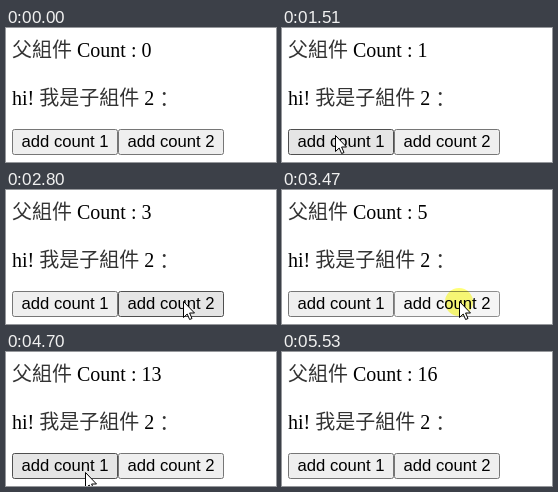
These frames come from a looping animation (270x134 px, 6.19 s). An HTML page:

```html
<!DOCTYPE html>
<html lang="zh-TW">
<head>
<meta charset="utf-8">
<style>
html, body { margin: 0; width: 100%; height: 100%; overflow: hidden; background: #fff; }
svg { display: block; }
.line { font: 20px "Liberation Serif", "Noto Sans CJK TC", "Noto Sans CJK", serif; }
.thin { font-weight: 300; fill: #333; }
.btn text { font: 16.667px "Liberation Sans", sans-serif; text-anchor: middle; }
.btn rect { fill: #efefef; stroke: #767676; }
.btn.hover rect { fill: #e5e5e5; stroke: #4f4f4f; }
.btn.active rect { fill: #f5f5f5; stroke: #8d8d8d; }
#halo { fill: #ffff78; mix-blend-mode: multiply; }
</style>
</head>
<body>
<svg width="270" height="134">
  <text class="line" x="6" y="29"><tspan class="thin">父組件</tspan> Count : <tspan id="count">0</tspan></text>
  <text class="line" x="6" y="77">hi! <tspan class="thin">我是子組件</tspan> 2<tspan class="thin" dy="2">：</tspan></text>
  <g class="btn">
    <rect x="6.5" y="101.5" width="105" height="25" rx="2"/>
    <text x="59" y="119">add count 1</text>
  </g>
  <g class="btn">
    <rect x="112.5" y="101.5" width="105" height="25" rx="2"/>
    <text x="165" y="119">add count 2</text>
  </g>
  <g id="mouse">
    <circle id="halo" cy="1" r="14"/>
    <path d="M.5 .5V16.5L4.2 13L6.6 18.5L9 17.5L6.6 12H11.5Z" fill="#fff" stroke="#000"/>
  </g>
</svg>
<script>
const LOOP = 6190, STEP = 70, ENTER = 260, LEAVE = 5530;
const moves = [], clicks = [];
let last = { x: 272, y: 124 };

// Glide from the last stop to x, y, bowing up or down by sag
function glide(start, span, x, y, sag = 0) {
  moves.push({ start, span, from: last, to: last = { x, y }, sag });
}

// The amount added is the number of the button under the cursor
function click(down) {
  clicks.push({ down, up: down + STEP, add: buttonAt(last.x, last.y) });
}

function buttonAt(x, y) {
  const inside = x >= 6 && x < 218 && y >= 101 && y < 127;
  return inside ? (x < 112 ? 1 : 2) : 0;
}

glide(260, 570, 65, 95, -68);
glide(900, 210, 53, 107);
click(1440);
glide(1970, 410, 177, 111);
click(2450);
click(3060);
for (let i = 0; i < 4; i++) click(3470 + 200 * i);
glide(4210, 290, 79, 120, 13);
click(4770);
glide(4910, 280, 172, 118, 14);
click(5320);
glide(5460, 0, 229, 126);

const $ = id => document.getElementById(id);
const buttons = document.querySelectorAll(".btn");
const mouse = $("mouse"), halo = $("halo"), count = $("count");

function position(t) {
  const { start, span, from, to, sag } = moves.filter(m => t >= m.start).pop();
  const ticks = Math.floor((t - start) / STEP) + 1;
  const u = Math.min(1, ticks * STEP / (span + STEP));
  return [
    Math.round(from.x + (to.x - from.x) * u),
    Math.round(from.y + (to.y - from.y) * u + sag * Math.sin(Math.PI * u))
  ];
}

function draw(t) {
  const visible = t >= ENTER && t < LEAVE;
  const pressed = clicks.some(c => t >= c.down && t < c.up);
  const [x, y] = visible ? position(t) : [-50, -50];
  const over = buttonAt(x, y);

  count.textContent = clicks.reduce((sum, c) => sum + (t >= c.up ? c.add : 0), 0);
  mouse.setAttribute("transform", `translate(${x} ${y})`);
  halo.style.display = pressed ? "" : "none";
  buttons.forEach((button, i) => {
    button.classList.toggle("hover", over === i + 1);
    button.classList.toggle("active", over === i + 1 && pressed);
  });
}

const origin = performance.now();
function tick() {
  draw((performance.now() - origin) % LOOP);
  requestAnimationFrame(tick);
}
tick();
</script>
</body>
</html>
```
